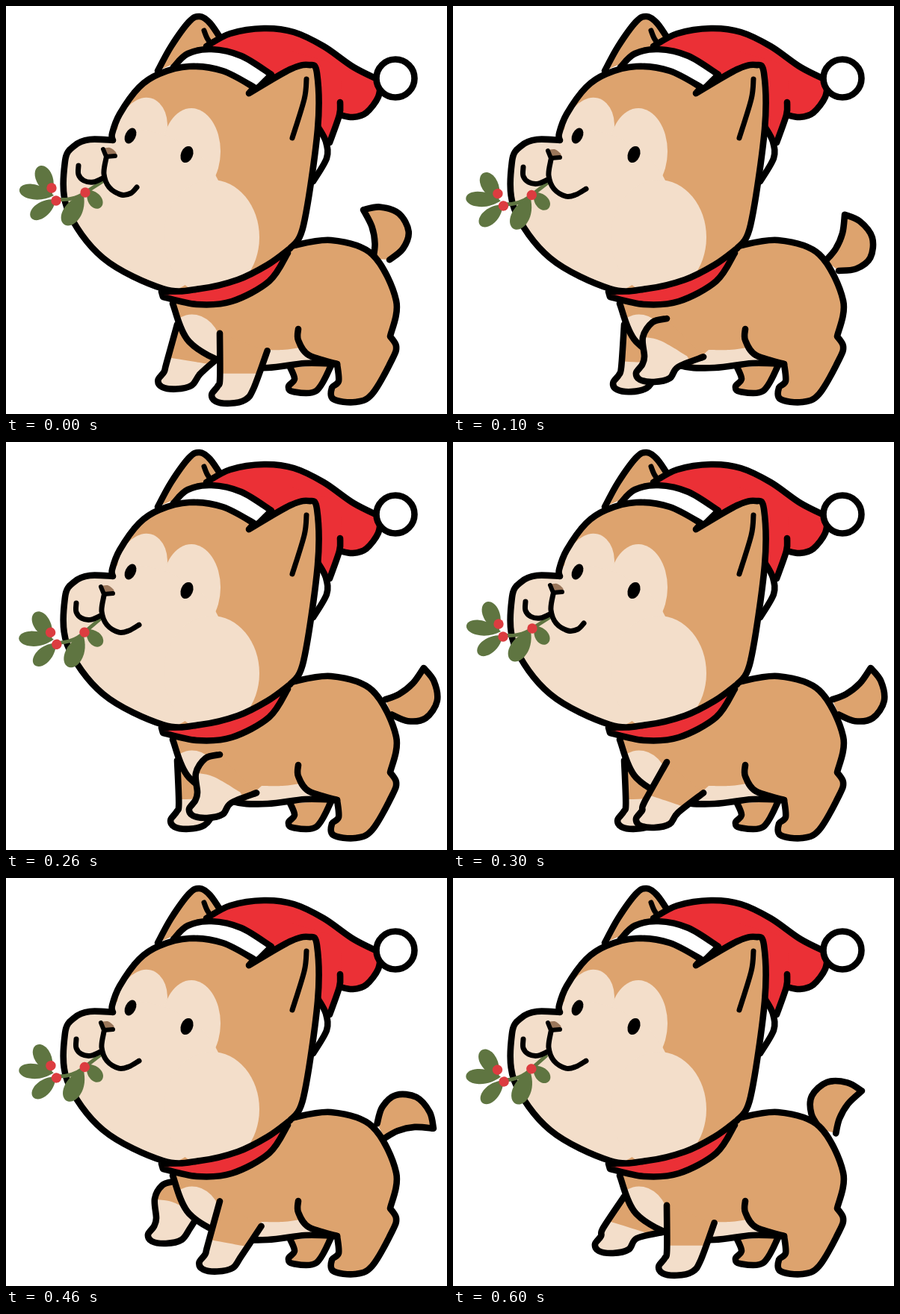
An HTML page for the animation above (0.7 s loop, 590 by 547 pixels).

```html
<!DOCTYPE html>
<html lang="en">
<head>
<meta charset="utf-8">
<title>Walking holiday puppy</title>
<style>
  html, body { margin: 0; width: 100%; height: 100%; overflow: hidden; background: #fff; }
  svg { display: block; width: 590px; height: 547px; }
  path, circle { stroke-linecap: round; stroke-linejoin: round; }
  .pose { visibility: hidden; animation: show 700ms step-end infinite; }
  @keyframes show {
    0% { visibility: visible; }
    14.2857%, 100% { visibility: hidden; }
  }
</style>
</head>
<body>
<svg id="stage" viewBox="0 0 590 547"></svg>
<script>
const TAN = '#dda36e', CREAM = '#f3deca', RED = '#eb3036', GREEN = '#5f7541', BERRY = '#dc3c40', BROWN = '#9a765a';
const STEP = 100, POSES = 7;
let clips = 0;

// Smooth curve through "x,y" points; "|" marks a sharp corner.
function curve(text) {
  let d = '', last = null;
  for (const part of text.split('|')) {
    const pts = part.trim().split(/\s+/).map(p => p.split(',').map(Number));
    if (last) pts.unshift(last);
    else d = 'M' + pts[0];
    for (let i = 0; i < pts.length - 1; i++) {
      const b = pts[i], c = pts[i + 1], a = pts[i - 1] || b, e = pts[i + 2] || c;
      const c1 = b.map((v, k) => (v + (c[k] - a[k]) / 6).toFixed(1));
      const c2 = c.map((v, k) => (v - (e[k] - b[k]) / 6).toFixed(1));
      d += `C${c1} ${c2} ${c}`;
    }
    last = pts[pts.length - 1];
  }
  return d;
}

const fill = (pts, color) => `<path d="${curve(pts)}" fill="${color}"/>`;
const line = (pts, width = 8.6) =>
  `<path d="${curve(pts)}" fill="none" stroke="#000" stroke-width="${width}"/>`;
const shape = (pts, color) => fill(pts, color) + line(pts);
const oval = (x, y, rx, ry, turn, color) =>
  `<ellipse rx="${rx}" ry="${ry}" transform="translate(${x} ${y}) rotate(${turn})" fill="${color}"/>`;

// Filled outline with markings kept inside it.
function marked(outline, color, marks) {
  const id = 'clip' + clips++;
  return `<clipPath id="${id}"><path d="${curve(outline)}"/></clipPath>` + fill(outline, color) +
    `<g clip-path="url(#${id})">${marks}</g>` + line(outline);
}

// One child per pose, each visible for its own step of the loop.
const poses = draw => Array.from({ length: POSES }, (_, i) =>
  `<g class="pose" style="animation-delay:${(i - POSES) * STEP}ms">${draw(i)}</g>`).join('');

// The tail swings on the rump; its tip flips over for the way back.
function tail(i) {
  const wave = Math.cos(2 * Math.PI * (i + 0.82) / POSES) * 1.4;
  const swing = -49 - 31 * Math.max(-1, Math.min(1, wave));
  const flip = i < 4 ? 1 : -1;
  const slide = flip > 0 ? (swing + 80) / 62 : 0;
  return `<g transform="translate(${502 + 10 * slide} ${339 + 16 * slide}) rotate(${swing - 30 * flip}) scale(1 ${flip})">` +
    shape('4,-10 22,-1 45,3 70,0 | 66,22 49,43 22,47 3,32 -5,10', TAN) + '</g>';
}

// Each step: the planted paw eases back, then the leg lifts for two poses.
function gait(k, [x, y]) {
  const lifted = k > 4, push = lifted ? 0 : Math.sin(Math.PI * k / POSES);
  const toe = lifted ? [x, y - 13] : [x + 31 * push, y + 16 * Math.sqrt(push)];
  return { lifted, toe, reach: 31 * (1 - push) };
}

function leg({ lifted, toe }, top, back) {
  const at = (dx, dy) => [toe[0] + dx, toe[1] + dy];
  const knee = at(9, -48);
  const bend = lifted ? [[top[0] * 0.4 + knee[0] * 0.6, top[1] + 5], knee] : [];
  const paw = [at(11, -22), at(8, -11), toe, at(5, 9), at(24, 12), at(45, 7), at(56, -8)];
  const tilt = (top[0] - toe[0] - 11) / 90, rise = lifted ? -45 : -28, bow = lifted ? 9 : 0;
  const sock = [-40, 0, 40].map(dx => at(28 + dx, rise + tilt * dx + (dx ? bow : 0)));
  return marked([top, ...bend, ...paw, back].join(' '), TAN,
    fill(sock.join(' ') + '|360,545|180,545', CREAM));
}

function farLeg(i) {
  const step = gait((i + 1) % POSES, [190, 491]);
  return step.lifted ? leg(step, [224, 407], [253, 459]) : leg(step, [229, 427], [280, 475]);
}

function nearLeg(i) {
  const step = gait((i + 4) % POSES, [245, 505]), r = step.reach;
  return leg(step, [286, 439 - 0.32 * r - (step.lifted ? 10 : 0)], [350 - 0.48 * r, 462 + 0.27 * r]);
}

const leaf = (x, y, turn, length, width) =>
  `<path transform="translate(${x} ${y}) rotate(${turn}) scale(${length / 40} ${width / 20})"
    d="M0 0C8-7 17-11 27-10C44-8 44 8 27 10C17 11 8 7 0 0Z" fill="${GREEN}"/>`;
const berry = (x, y) => `<circle cx="${x}" cy="${y}" r="6.7" fill="${BERRY}"/>`;
const sprig =
  leaf(61, 254, -113, 43, 22) + leaf(64, 254, 190, 47, 20) + leaf(67, 259, 143, 42, 20) +
  leaf(104, 253, 123, 48, 24) + leaf(109, 246, 55, 30, 18) +
  `<path d="M66 259Q90 262 106 250L128 236" fill="none" stroke="${GREEN}" stroke-width="5"/>` +
  berry(61, 244) + berry(67, 261) + berry(106, 250);

// The sprig sags ever more slowly, twice per loop; the mouth tightens with it.
function mouth(i) {
  const n = i < 3 ? i : i - 3, sag = 10.5 * (1 - 0.5 ** n), pull = n ? 3 : 0;
  return `<g transform="translate(${-0.4 * sag} ${0.28 * sag}) rotate(${-sag} 128 236)">${sprig}</g>` +
    `<g transform="translate(${-pull} ${pull * 0.7})">` +
    fill('130,191 | 139,190 147,196 147,201 | 134,203', BROWN) +
    line('130,192 | 134,202 | 146,201', 6) +
    line('97,214 97,226 104,234 117,236 131,230', 7) +
    line(`134,204 131,225 138,243 154,253 167,251 ${175 + 2 * pull},243`, 7) + '</g>';
}

const hindFoot = shape('380,484 386,500 378,510 384,517 415,516 435,482', TAN);

const body = marked(
  '380,322 435,314 490,333 522,395 514,443 | 522,456 517,473 490,520 467,531 438,527 436,512 445,503 443,480 | ' +
  '400,479 350,485 300,481 245,450 223,399', TAN,
  oval(252, 456, 36, 43, -15, CREAM) + fill('342,461 370,461 394,458 | 412,474 | 400,495 | 305,495 | 342,461', CREAM)
) + line('391,433 391,448 405,468 443,480');

const collar = shape('208,383 | 260,376 377,331 | 352,369 302,396 255,400 210,390 | 208,383', RED);

const hat =
  shape('203,87 221,54 245,21 259,14 273,23 290,48', TAN) + line('265,33 269,43 275,52', 7) +
  shape('268,54 300,37 345,30 385,35 425,54 465,82 501,100 | 498,122 482,143 464,149 447,146', RED) +
  fill('380,60 | 450,80 | 447,146 | 433,183 | 415,162 | 380,100', RED) +
  line('447,129 446,146 433,183') +
  shape('418,163 428,182 429,204 411,235', '#fff') +
  '<circle cx="521" cy="97" r="25.5" fill="#fff" stroke="#000" stroke-width="8.6"/>' +
  shape('224,82 243,64 275,58 315,67 355,92 | 335,112 | 224,82', '#fff');

const face =
  oval(182, 168, 33, 46, 15, CREAM) + oval(248, 195, 39, 58, 0, CREAM) +
  oval(165, 280, 130, 115, 0, CREAM) + oval(275, 310, 64, 77, 0, CREAM);
const head = marked(
  '143,180 | 142,171 152,145 178,109 205,91 245,81 290,87 332,109 | 325,117 | ' +
  '380,85 405,79 416,90 417,165 398,294 380,325 | ' +
  '350,347 310,367 260,379 210,379 130,338 82,272 79,208 92,187 112,179 143,180', TAN, face
) + line('402,98 399,125 383,177', 7) +
  oval(166.5, 174, 7, 11, 26, '#000') + oval(242, 199, 8, 11.5, 22, '#000');

document.getElementById('stage').innerHTML =
  poses(tail) + hindFoot + poses(farLeg) + body + poses(nearLeg) + collar + hat + head + poses(mouth);
</script>
</body>
</html>
```
